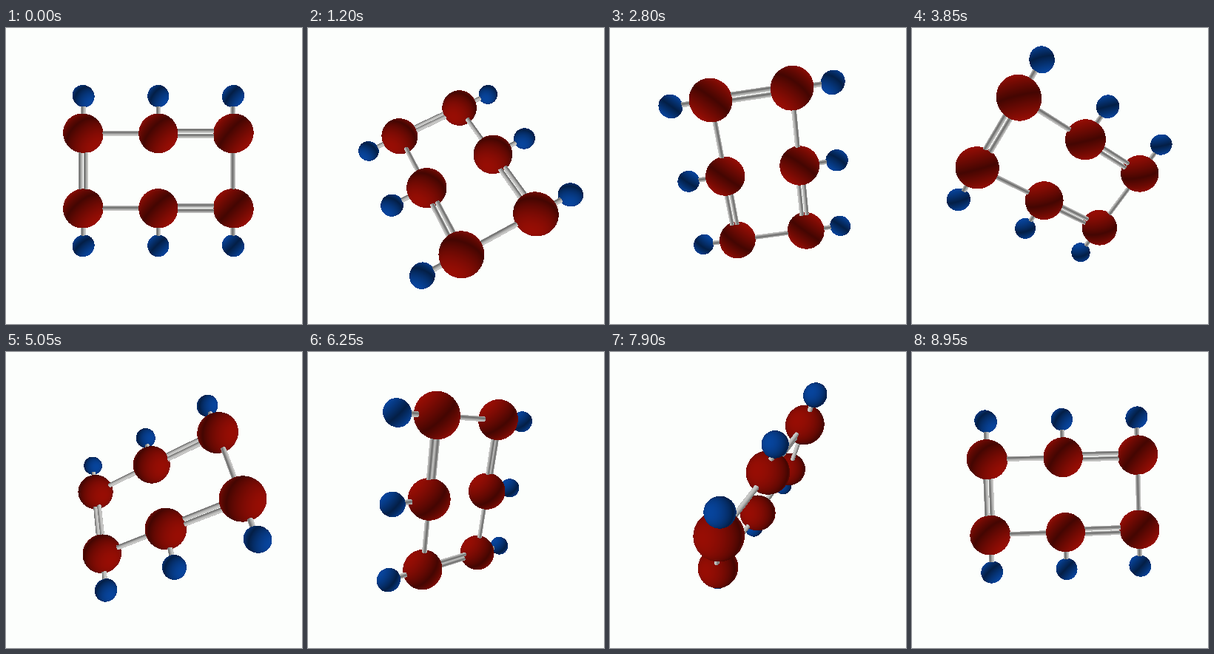
An HTML page with a canvas that plays this animation: 400 px wide and 400 px high, repeating every 9000 ms.

```html
<!DOCTYPE html>
<html lang="en">
<head>
<meta charset="utf-8">
<title>Rotating molecule</title>
<style>
html, body { margin: 0; width: 100%; height: 100%; overflow: hidden; background: #fcfefc; }
canvas { display: block; width: 400px; height: 400px; }
</style>
</head>
<body>
<canvas id="stage" width="400" height="400"></canvas>
<script>
const SIZE = 400, LOOP = 9000, STEP = 50;
const FOCAL = 404, DISTANCE = 4;
const OFFSET = [0.057, 0.068, 0];
const AMBIENT = 0.45;
const RED = [152, 14, 5], BLUE = [8, 69, 157], GREY = [236, 236, 234];

const ctx = document.getElementById('stage').getContext('2d');
const image = ctx.createImageData(SIZE, SIZE);
const pixels = new Uint32Array(image.data.buffer);
const depth = new Float32Array(SIZE * SIZE);

const dot = (a, b) => a[0] * b[0] + a[1] * b[1] + a[2] * b[2];
const sub = (a, b) => [a[0] - b[0], a[1] - b[1], a[2] - b[2]];
const scale = (a, k) => [a[0] * k, a[1] * k, a[2] * k];
const unit = a => scale(a, 1 / Math.hypot(...a));

// Lights shine from both ends of this axis, which turns with the molecule.
const LIGHT = unit([1, -1, 0.42]);

const balls = [], rods = [];
const rod = (x1, y1, x2, y2, r = 0.032) => rods.push({ a: [x1, y1, 0], b: [x2, y2, 0], r });
function doubleRod(x1, y1, x2, y2) {
  const dx = x1 === x2 ? 0.035 : 0, dy = 0.035 - dx;
  for (const s of [-1, 1]) rod(x1 + s * dx, y1 + s * dy, x2 + s * dx, y2 + s * dy, 0.03);
}
for (const side of [-1, 1]) {
  for (const x of [-1, 0, 1]) {
    balls.push({ p: [x, side / 2, 0], r: 0.262, color: RED });
    balls.push({ p: [x, side, 0], r: 0.144, color: BLUE });
    rod(x, side / 2, x, side);
  }
  rod(-1, side / 2, 0, side / 2);
  doubleRod(0, side / 2, 1, side / 2);
}
doubleRod(-1, -0.5, -1, 0.5);
rod(1, -0.5, 1, 0.5);

// Equal turns about x, then z, then y.
function rotate([x, y, z], c, s) {
  [y, z] = [y * c + z * s, z * c - y * s];
  [x, y] = [x * c + y * s, y * c - x * s];
  return [x * c - z * s, y, x * s + z * c];
}

// Position relative to the camera, which looks down the negative z axis.
function place(p, c, s) {
  const q = rotate(p, c, s);
  return [q[0] + OFFSET[0], q[1] + OFFSET[1], q[2] - DISTANCE];
}

function paint(points, r, color, light, hit) {
  let left = SIZE, right = 0, top = SIZE, bottom = 0;
  for (const p of points) {
    const k = FOCAL / -p[2], x = SIZE / 2 + p[0] * k, y = SIZE / 2 - p[1] * k;
    const margin = r * k * 1.2 + 2;
    left = Math.min(left, x - margin);
    right = Math.max(right, x + margin);
    top = Math.min(top, y - margin);
    bottom = Math.max(bottom, y + margin);
  }
  left = Math.max(0, Math.floor(left));
  top = Math.max(0, Math.floor(top));
  right = Math.min(SIZE, right);
  bottom = Math.min(SIZE, bottom);
  for (let y = top; y < bottom; y++) {
    for (let x = left; x < right; x++) {
      const ray = [(x + 0.5 - SIZE / 2) / FOCAL, (SIZE / 2 - y - 0.5) / FOCAL, -1];
      const found = hit(ray), i = y * SIZE + x;
      if (!found || found.t >= depth[i]) continue;
      depth[i] = found.t;
      const k = AMBIENT + (1 - AMBIENT) * Math.abs(dot(found.n, light));
      pixels[i] = 0xff000000 | color[2] * k << 16 | color[1] * k << 8 | color[0] * k;
    }
  }
}

function drawBall(p, r, color, light) {
  const pp = dot(p, p) - r * r;
  paint([p], r, color, light, ray => {
    const a = dot(ray, ray), b = dot(ray, p), disc = b * b - a * pp;
    if (disc < 0) return null;
    const t = (b - Math.sqrt(disc)) / a;
    return { t, n: scale(sub(scale(ray, t), p), 1 / r) };
  });
}

function drawRod(from, to, r, light) {
  const span = sub(to, from), length = Math.hypot(...span), axis = unit(span);
  const along = dot(from, axis), base = sub(from, scale(axis, along));
  const bb = dot(base, base) - r * r;
  paint([from, to], r, GREY, light, ray => {
    const rayAlong = dot(ray, axis), flat = sub(ray, scale(axis, rayAlong));
    const a = dot(flat, flat), b = dot(flat, base), disc = b * b - a * bb;
    if (disc < 0) return null;
    const t = (b - Math.sqrt(disc)) / a, h = rayAlong * t - along;
    if (h < 0 || h > length) return null;
    return { t, n: scale(sub(scale(flat, t), base), 1 / r) };
  });
}

function draw(time) {
  const angle = 2 * Math.PI * Math.floor(time % LOOP / STEP) * STEP / LOOP;
  const c = Math.cos(angle), s = Math.sin(angle);
  const light = rotate(LIGHT, c, s);
  pixels.fill(0xfffcfefc);
  depth.fill(Infinity);
  for (const { p, r, color } of balls) drawBall(place(p, c, s), r, color, light);
  for (const { a, b, r } of rods) drawRod(place(a, c, s), place(b, c, s), r, light);
  ctx.putImageData(image, 0, 0);
}

const start = performance.now();
function tick() {
  draw(performance.now() - start);
  requestAnimationFrame(tick);
}
tick();
</script>
</body>
</html>
```
